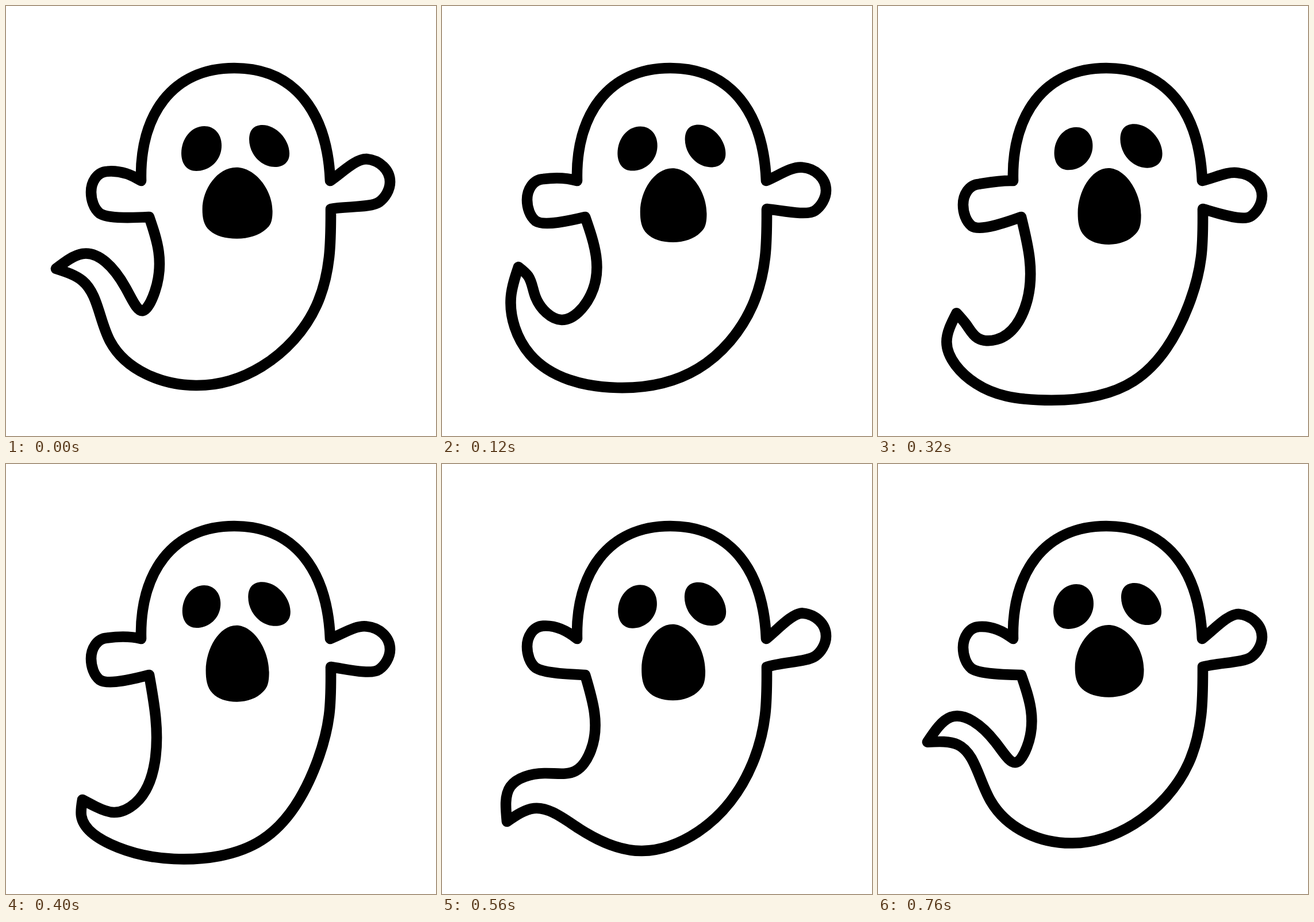
An HTML page that plays this animation: 748x748 px, repeating every 800 ms.

```html
<!DOCTYPE html>
<html lang="en">
<head>
<meta charset="utf-8">
<title>Floating ghost</title>
<style>
  html, body { margin: 0; width: 100%; height: 100%; overflow: hidden; background: #fff; }
  svg { display: block; width: 100%; height: 100%; }
</style>
</head>
<body>
<svg viewBox="0 0 748 748">
  <path id="body" fill="#fff" stroke="#000" stroke-width="18.6" stroke-linejoin="round"/>
  <path id="leftEye" d="M345 209C362 209 375 222 375 243C375 268 355 287 331 287C314 287 305 274 305 256C305 231 322 209 345 209Z"/>
  <path id="rightEye" d="M446 207C470 207 493 232 493 257C493 272 482 280 468 280C443 280 423 257 423 232C423 216 431 207 446 207Z"/>
  <path id="mouth" d="M401 281C434 281 464 320 464 357C464 378 459 383 452 389C441 399 422 405 402 405C382 405 365 400 355 391C344 382 342 368 342 354C342 319 368 281 401 281Z"/>
</svg>
<script>
const LOOP = 800, STEP = 40;

// Key poses: time, arm swing, then the tail's crook, bend, hump, tip, outer bend, flank and bottom.
const poses = [
  [0, -0.28, 238, 530, 208, 490, 133, 431, 87, 457, 133, 478, 181, 583, 330, 660],
  [120, 0.42, 208, 546, 163, 507, 150, 470, 133, 454, 120, 505, 153, 606, 305, 664],
  [240, 1, 192, 561, 158, 536, 147, 503, 137, 485, 113, 548, 152, 637, 278, 679],
  [400, 0.5, 225, 590, 188, 606, 156, 596, 133, 584, 131, 612, 195, 667, 292, 687],
  [560, -0.6, 232, 534, 178, 538, 119, 561, 113, 622, 160, 599, 238, 634, 348, 673],
  [640, -1, 236, 495, 170, 487, 112, 513, 108, 596, 157, 557, 240, 616, 357, 663]
];

const head = 'C559 187 504 108 397 108C289 108 232 190 235 304';
const leftPit = [249, 367], rightPit = [565, 353];
const rightSide = [[540, 521], [562, 437], rightPit];

// Bezier points of the arms at rest, from one end of the shoulder to the other.
const leftArm = [[215, 294], [195, 291], [176, 293], [158, 294], [148, 312], [148, 329],
  [148, 343], [153, 358], [163, 366], [178, 376], [225, 370], leftPit];
const rightArm = [[590, 351], [635, 357], [649, 347], [659, 340], [668, 326], [668, 312],
  [668, 291], [650, 274], [627, 272], [608, 271], [585, 292], [564, 304]];

// Tangent of the parabola through three values.
const slope = (a, b, c, h1, h2) => ((b - a) / h1 * h2 + (c - b) / h2 * h1) / (h1 + h2);

// Smooth periodic blend of the key poses.
function poseAt(t) {
  const n = poses.length, i = poses.findLastIndex(pose => pose[0] <= t);
  const near = [-1, 0, 1, 2].map(k => poses[(i + k + n) % n]);
  const [h0, h, h2] = [0, 1, 2].map(k => (near[k + 1][0] - near[k][0] + LOOP) % LOOP);
  const u = (t - near[1][0]) / h;
  return near[1].map((_, j) => {
    const [a, b, c, d] = near.map(pose => pose[j]);
    const m1 = slope(a, b, c, h0, h) * h, m2 = slope(b, c, d, h, h2) * h;
    return b + u * (m1 + u * (3 * (c - b) - 2 * m1 - m2 + u * (2 * (b - c) + m1 + m2)));
  });
}

// Tangents of a natural cubic spline, found by relaxation.
function splineTangents(values, gaps) {
  const last = gaps.length, m = values.map(() => 0);
  const d = gaps.map((gap, i) => (values[i + 1] - values[i]) / gap);
  for (let round = 0; round < 30; round++) {
    m[0] = (3 * d[0] - m[1]) / 2;
    for (let i = 1; i < last; i++) {
      const l = gaps[i - 1], r = gaps[i];
      m[i] = (3 * (r * d[i - 1] + l * d[i]) - r * m[i - 1] - l * m[i + 1]) / (2 * (l + r));
    }
    m[last] = (3 * d[last - 1] - m[last - 1]) / 2;
  }
  return m;
}

function spline(points) {
  const gaps = points.slice(1).map((p, i) => Math.hypot(p[0] - points[i][0], p[1] - points[i][1]));
  const tangents = [0, 1].map(axis => splineTangents(points.map(p => p[axis]), gaps));
  const handle = (i, reach) => points[i].map((v, axis) => v + tangents[axis][i] * reach / 3);
  return gaps.map((gap, i) => `C${handle(i, gap)} ${handle(i + 1, -gap)} ${points[i + 1]}`).join('');
}

// The hand moves up and down; the shoulder stays in place.
const arm = (points, shoulder, lift) => 'C' + points.map(([x, y], i) =>
  [x, i === points.length - 1 ? y : y + lift * Math.min(1, Math.abs(x - shoulder) / 50)]).join(' ');

const byId = id => document.getElementById(id);
const place = (id, x, y, sx, sy, toX = x, toY = y) =>
  byId(id).setAttribute('transform', `translate(${toX} ${toY}) scale(${sx} ${sy}) translate(${-x} ${-y})`);

function draw(t) {
  const [, swing, ...xy] = poseAt(t);
  const [crook, bend, hump, tip, outerBend, flank, bottom] =
    Array.from({ length: 7 }, (_, i) => xy.slice(2 * i, 2 * i + 2));
  const side = [259, 311 + 0.35 * crook[1]];
  const belly = [445, bottom[1] - 33];

  byId('body').setAttribute('d', `M${rightPit}`
    + arm(rightArm, 565, 21 * swing) + head
    + arm(leftArm, 242, 19 * swing)
    + spline([leftPit, side, crook, bend, hump, tip])
    + spline([tip, outerBend, flank, bottom, belly, ...rightSide]) + 'Z');

  const phase = 2 * Math.PI * t / LOOP;
  const swell = (1 - Math.cos(phase)) / 40;
  place('leftEye', 340, 248, 1 - swell, 1 - swell);
  place('rightEye', 458, 243.5, 1 + swell, 1 + swell);

  const open = Math.min(1, 1.15 * Math.sin(phase / 2));
  place('mouth', 403, 281, 1 - 0.098 * open, 1 + 0.073 * open, 402.6, 280.7 + 2 * Math.sin(phase));
}

const startTime = performance.now();
function tick() {
  const t = (performance.now() - startTime) % LOOP;
  draw(Math.floor(t / STEP) * STEP);
  requestAnimationFrame(tick);
}
tick();
</script>
</body>
</html>
```
